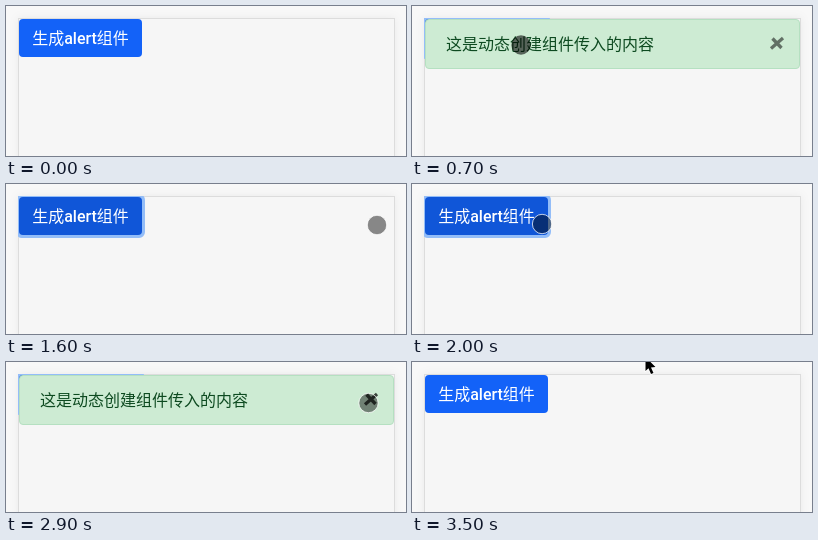
Animation of 400 by 150 pixels, one loop 3.6 s. Source, as an HTML page:

```html
<!DOCTYPE html>
<html lang="zh-CN">
<head>
<meta charset="utf-8">
<title>alert</title>
<style>
  html, body { margin: 0; width: 100%; height: 100%; overflow: hidden; background: #f8f8f8; }
  svg { display: block; width: 400px; height: 150px; }
  text { font: 16px Roboto, "Noto Sans CJK SC", "Noto Sans CJK", sans-serif; }
  .panel { fill: #f6f6f6; stroke: #dcdcdc; filter: drop-shadow(0 0 5px rgba(0, 0, 0, .06)); }
</style>
</head>
<body>
<svg viewBox="0 0 400 150" lang="zh-CN">
  <clipPath id="inside"><rect x="12" y="12" width="377" height="138"/></clipPath>
  <rect class="panel" x="12.5" y="12.5" width="376" height="160"/>
  <g clip-path="url(#inside)">
    <rect id="ring" x="10" y="10" width="129" height="44" rx="6" fill="#93bdf8"/>
    <rect id="button" x="13" y="13" width="123" height="38" rx="4"/>
    <text x="74.5" y="38" text-anchor="middle" fill="#fff" font-weight="500" style="font-weight:500">生成alert组件</text>
  </g>
  <g id="alert">
    <rect x="13.5" y="13.5" width="374" height="49" rx="3.5" fill="#cdebd3" stroke="#b5e0c1"/>
    <text x="34" y="44" fill="#0d4a20">这是动态创建组件传入的内容</text>
    <path id="close" d="M360.5 32.5 369.5 42M371 32 359 42.5" fill="none" stroke="#000" stroke-width="3.3"/>
  </g>
  <circle id="touch" r="9.7" stroke="#fff"/>
  <path id="arrow" d="M233.5-5V9L236.5 6.3 239 12 241.5 11 239 5.5 243.5 5Z" fill="#000" stroke="#fff" stroke-width="1.6" paint-order="stroke"/>
</svg>
<script>
const LOOP = 3600, STEP = 100;
const el = id => document.getElementById(id);
const [ring, button, alertBox, close, touch, arrow] =
  ["ring", "button", "alert", "close", "touch", "arrow"].map(el);

const smooth = p => p * p * (3 - 2 * p);
const easeOut = power => p => 1 - (1 - p) ** power;

// start, end, from, to, easing
const moves = [
  [100, 500, [105, 93], [109, 39], easeOut(2)],
  [700, 1100, [109, 39], [370, 45], smooth],
  [1100, 1300, [370, 45], [371, 41], smooth],
  [1600, 2100, [371, 41], [130, 40], easeOut(5)],
  [2400, 2900, [130, 40], [362.5, 41], smooth],
  [3200, 3400, [362.5, 41], [300, 20], smooth]
];

const within = (t, ...spans) => spans.some(([a, b]) => t >= a && t < b);
const show = (node, on) => node.setAttribute("display", on ? "inline" : "none");

function touchPoint(t) {
  const [start, end, from, to, ease] = moves.filter(m => m[0] <= t).pop() || moves[0];
  const p = ease(Math.min(1, Math.max(0, (t - start) / (end - start))));
  return from.map((v, i) => v + (to[i] - v) * p);
}

function draw(time) {
  const t = Math.floor((time % LOOP) / STEP) * STEP;
  const [x, y] = touchPoint(t);
  const pressed = within(t, [600, 800], [1300, 1400], [2200, 2500], [3100, 3200]);
  const focused = within(t, [700, 3500]);

  show(ring, focused);
  button.setAttribute("fill", within(t, [600, 3500]) ? "#1056d8" : "#1362f8");
  show(alertBox, within(t, [700, 1400], [2400, 3200]));
  close.setAttribute("opacity", Math.hypot(x - 365, y - 37) < 13 ? .72 : .52);

  show(touch, within(t, [100, 3500]));
  touch.setAttribute("cx", x);
  touch.setAttribute("cy", y);
  touch.setAttribute("fill-opacity", pressed ? .58 : .45);
  touch.setAttribute("stroke-opacity", pressed ? 0 : .75);
  show(arrow, t >= 3500);
}

const begin = performance.now();
function tick() {
  draw(performance.now() - begin);
  requestAnimationFrame(tick);
}
tick();
</script>
</body>
</html>
```
